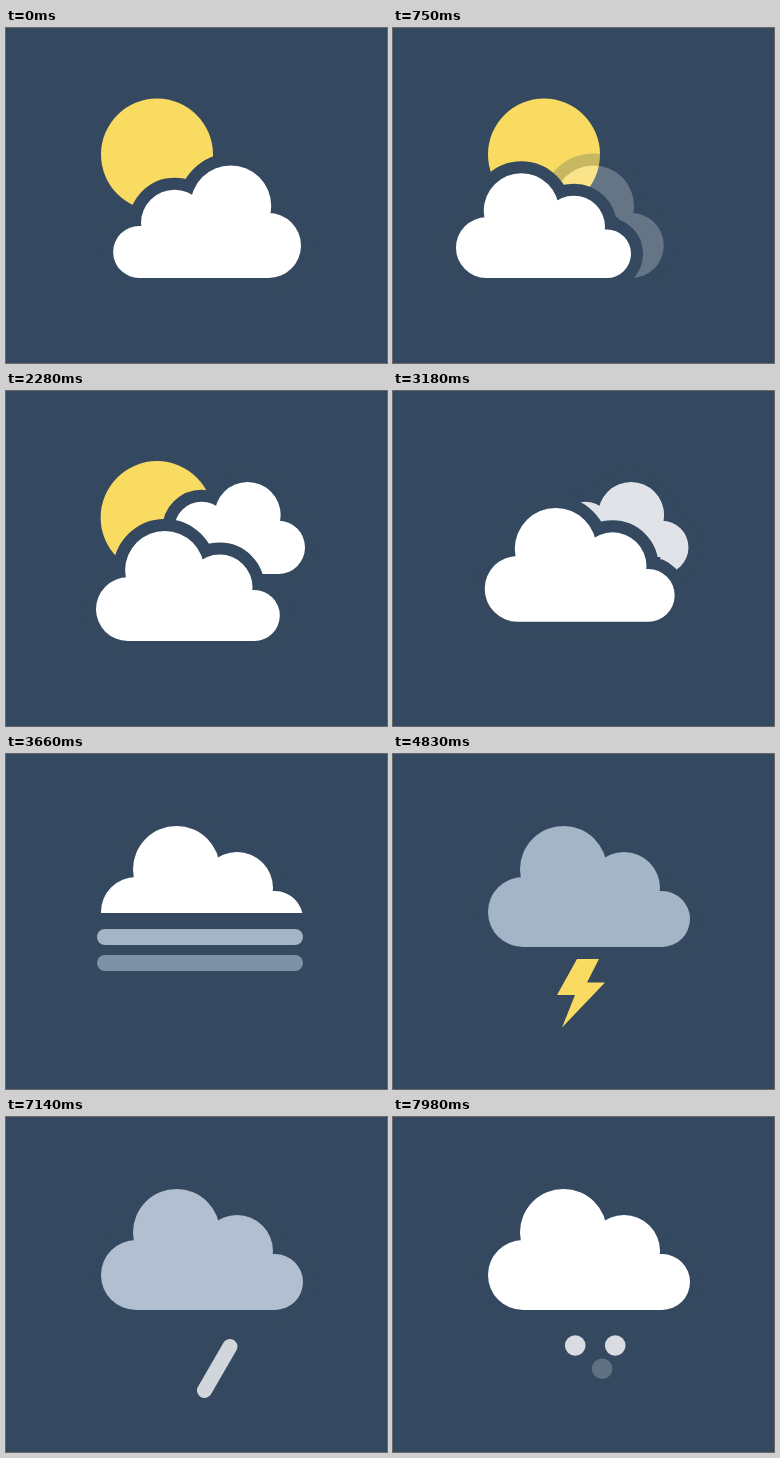
Recreate the animation shown at these times as an HTML page. Size 381 by 335 pixels, loop 8 s.

```html
<!DOCTYPE html>
<html lang="en">
<head>
<meta charset="utf-8">
<title>Weather</title>
<style>
  html, body { margin: 0; width: 100%; height: 100%; overflow: hidden; background: #34495f; }
  svg { display: block; width: 381px; height: 335px; }
  .cloud { stroke: #34495f; stroke-width: 24; paint-order: stroke; vector-effect: non-scaling-stroke; }
  .drop { stroke-width: 15; stroke-linecap: round; }
</style>
</head>
<body>
<svg viewBox="0 0 381 335">
  <defs>
    <clipPath id="below"><rect y="205" width="381" height="130"/></clipPath>
  </defs>
  <circle id="sun" cx="151" cy="126.5" fill="#f9db62"/>
  <g id="back"><path class="cloud" fill="#fff"/></g>
  <g id="front"><path class="cloud"/></g>
  <rect id="cover" width="381" height="200" fill="#34495f"/>
  <g fill="#a5b5c8">
    <rect id="bar1" x="91" y="175" width="206" height="16" rx="8"/>
    <rect id="bar2" x="91" y="201" width="206" height="16" rx="8"/>
  </g>
  <g clip-path="url(#below)">
    <path id="bolt" fill="#f9db62" d="M184 205H206L194 228.5H212L169 273.5L182 241H164Z"/>
    <path id="drop1" class="drop" stroke="#5faedd" d="M155.500 215.500L130 259.500"/>
    <path id="drop2" class="drop" stroke="#fff" d="M232 215.500L206.500 259.500"/>
  </g>
  <g fill="#fff">
    <circle id="flake1" cx="182" cy="229" r="10.300"/>
    <circle id="flake2" cx="222" cy="229" r="10.300"/>
    <circle id="flake3" cx="205.500" cy="259" r="10.300"/>
  </g>
</svg>
<script>
const LOOP = 8000;
const $ = id => document.getElementById(id);
const set = (id, attrs) => {
  for (const k in attrs) $(id).setAttribute(k, attrs[k]);
};
const move = (x, y) => `translate(${x} ${y})`;

// Easing
const out = u => 1 - (1 - u) ** 3;
const backOut = u => 1 + 3.1 * (u - 1) ** 3 + 2.1 * (u - 1) ** 2;
const backIn = u => u * u * (3.7 * u - 2.7);

// Cloud outline: left edge at x = 0, base at y = 0, 202 wide
const ring = (x, y, r) => `M${x - r} ${y}a${r} ${r} 0 1 1 ${2 * r} 0a${r} ${r} 0 1 1 ${-2 * r} 0z`;
const outline = ring(35, -35, 35) + ring(75.5, -77.5, 43.5) + ring(136, -59, 36) +
  ring(174, -28, 28) + 'M35 0V-56H174V0z';
document.querySelectorAll('.cloud').forEach(c => c.setAttribute('d', outline));

const grey = [165, 181, 200];

function draw(t) {
  const seg = (a, b) => Math.min(1, Math.max(0, (t - a) / (b - a)));

  set('sun', { r: 56 * Math.max(0, 1 - backIn(seg(2250, 2850))) });

  // Mirrored cloud: first alone, later behind the front one
  const leave = seg(630, 790), enter = out(seg(1500, 1800)), hide = seg(3150, 3360);
  const early = t < 1000;
  set('back', {
    transform: early
      ? move(295 - 32 * leave, 250) + 'scale(-.93 .93)'
      : move(279 + 20 * enter - 24 * hide, 183) + 'scale(-.76 .76)',
    opacity: early ? 1 - leave : enter * (1 - hide)
  });

  const slide = backOut(seg(700, 1260));
  const shrink = out(seg(1500, 1830));
  const rise = backOut(seg(3150, 3570));
  const size = .775 + .225 * slide - .09 * shrink + .09 * rise;
  const dark = seg(4380, 4620) - seg(7050, 7700);
  set('front', {
    transform: move(41 + 54 * slide - 5 * shrink + 5 * rise, 250 - 57 * rise) + `scale(${size})`,
    opacity: seg(690, 740),
    fill: `rgb(${grey.map(c => 255 + (c - 255) * dark)})`
  });

  // Fog hides the base of the cloud
  const fog = out(seg(3300, 3600)), clear = seg(4380, 4580);
  set('cover', { y: 253 - 94 * fog + 34 * out(clear), opacity: t < 3300 || t > 4580 ? 0 : 1 });
  set('bar1', { opacity: seg(3400, 3600) * (1 - clear) });
  set('bar2', { opacity: seg(3500, 3740) * (1 - clear) });

  const fall = seg(5130, 5450);
  set('bolt', {
    transform: move(0, -80 * (1 - backOut(seg(4500, 4830))) + 42 * fall * fall),
    opacity: t < 4500 ? 0 : 1 - fall
  });

  // Each drop enters, rests and leaves twice: [in, out, in, out, fade time]
  const rain = (id, start, exit, again, end, last) => {
    const second = t >= again;
    const come = out(second ? seg(again, again + 150) : seg(start, start + 280));
    const go = second ? seg(end, last) : seg(exit, again);
    const d = 34 * go - 82 * (1 - come);
    set(id, {
      transform: move(-.5 * d, .866 * d),
      opacity: t < start ? 0 : 1 - go * go
    });
  };
  rain('drop1', 5440, 6130, 6330, 6630, 7050);
  rain('drop2', 5610, 5900, 6030, 6900, 7410);

  const snow = (id, start, span) => {
    const u = seg(start, start + span), left = (1 - u) ** 2;
    set(id, { transform: move(6 * left, -12 * left), opacity: u });
  };
  snow('flake1', 7440, 670);
  snow('flake2', 7440, 670);
  snow('flake3', 7820, 720);
}

function tick() {
  draw(performance.now() % LOOP);
  requestAnimationFrame(tick);
}
tick();
</script>
</body>
</html>
```
